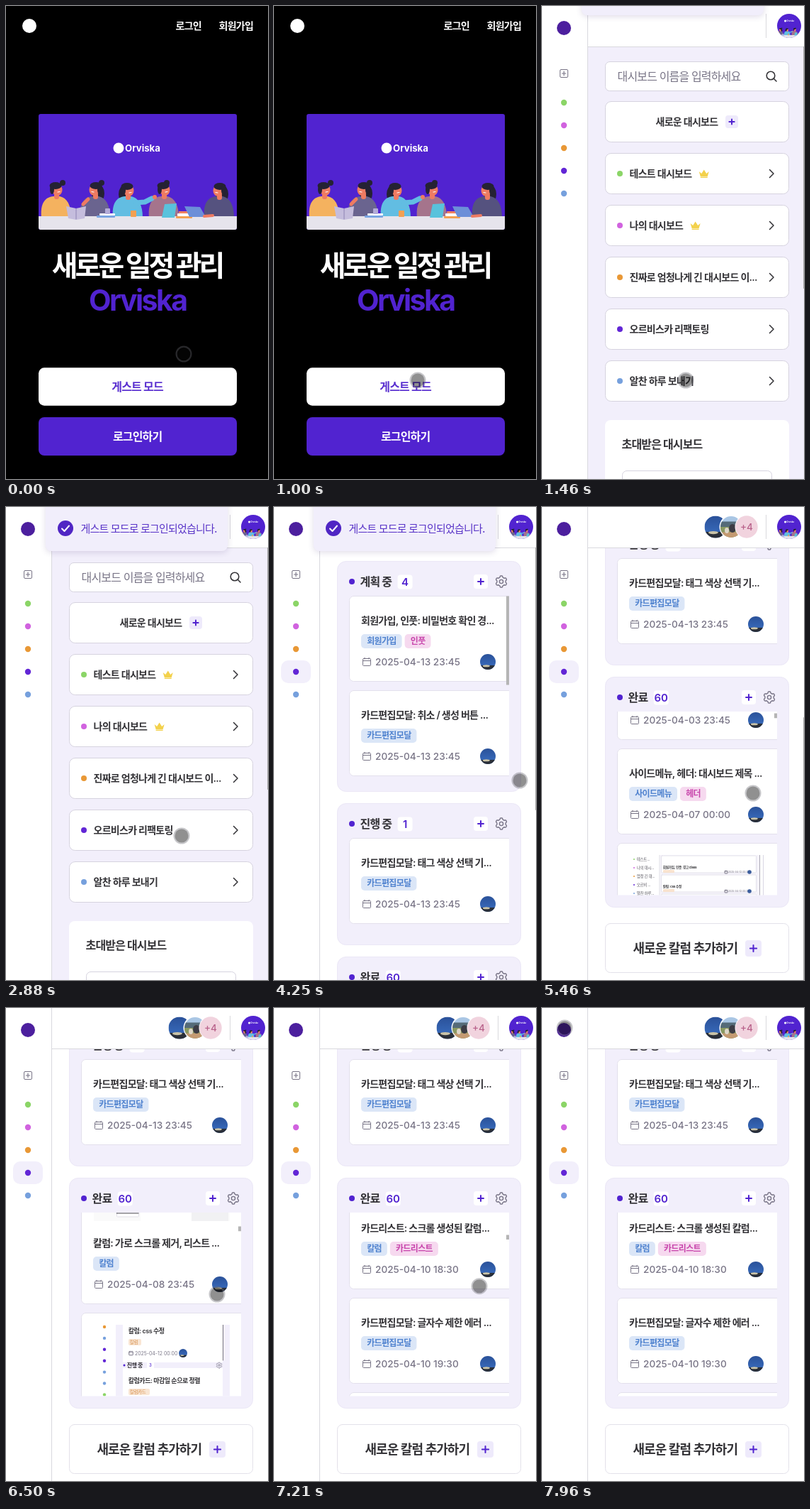
These frames come from a looping animation (370x666 px, 8000 ms). An HTML page with a canvas:

```html
<!DOCTYPE html>
<html lang="ko">
<head>
<meta charset="utf-8">
<title>Orviska</title>
<style>
html, body { margin: 0; width: 370px; height: 666px; overflow: hidden; background: #000; }
canvas { display: block; width: 370px; height: 666px; }
</style>
</head>
<body>
<canvas id="stage"></canvas>
<script>
const W = 370, H = 666, LOOP = 8000;
const canvas = document.getElementById('stage');
const ctx = canvas.getContext('2d');
const dpr = window.devicePixelRatio || 1;
canvas.width = W * dpr;
canvas.height = H * dpr;

const FONT = 'Inter, "Noto Sans CJK KR", "Noto Sans CJK JP", "Noto Sans CJK", sans-serif';
const PURPLE = '#5123d0', INK = '#333236', GRAY = '#787486', LILAC = '#f2effb', LINE = '#d9d9de';
const DOTS = ['#8bd567', '#d163df', '#e99836', '#6226d6', '#76a0dd'];
const TAGS = { b: ['#dbe6f7', '#4f82cf'], p: ['#f6d9ef', '#c846ac'] };

// drawing helpers
function box(x, y, w, h, r, fill, stroke) {
  ctx.beginPath();
  ctx.roundRect(x, y, w, h, r);
  if (fill) { ctx.fillStyle = fill; ctx.fill(); }
  if (stroke) { ctx.strokeStyle = stroke; ctx.lineWidth = 1; ctx.stroke(); }
}
function dot(x, y, r, fill) {
  ctx.beginPath();
  ctx.arc(x, y, r, 0, 7);
  ctx.fillStyle = fill;
  ctx.fill();
}
function oval(x, y, rx, ry, fill) {
  ctx.beginPath();
  ctx.ellipse(x, y, rx, ry, 0, 0, 7);
  ctx.fillStyle = fill;
  ctx.fill();
}
function path(points, color, width, fill) {
  ctx.beginPath();
  for (let i = 0; i < points.length; i += 2) ctx.lineTo(points[i], points[i + 1]);
  if (fill) { ctx.closePath(); ctx.fillStyle = color; ctx.fill(); return; }
  ctx.strokeStyle = color;
  ctx.lineWidth = width;
  ctx.lineCap = ctx.lineJoin = 'round';
  ctx.stroke();
}
// y is the optical middle of the line; returns the width
function text(s, x, y, size, weight, color, align = 'left', track) {
  const hangul = /[가-힣]/.test(s);
  const gap = track ?? (hangul ? -0.053 * size : 0);
  ctx.font = `${weight} ${size}px ${FONT}`;
  ctx.letterSpacing = gap + 'px';
  const w = ctx.measureText(s).width;
  if (align === 'center') x -= (w - gap) / 2;
  else if (hangul) x -= 0.03 * size;
  ctx.textAlign = 'left';
  ctx.fillStyle = color;
  ctx.fillText(s, x, y + 0.37 * size);
  return w;
}
function clipped(draw, ...area) {
  ctx.save();
  ctx.beginPath();
  if (area.length === 3) ctx.arc(...area, 0, 7); else ctx.rect(...area);
  ctx.clip();
  draw();
  ctx.restore();
}
function plus(x, y, r, color, width) {
  path([x - r, y, x + r, y], color, width);
  path([x, y - r, x, y + r], color, width);
}
function plusBox(x, y, size, bg) {
  box(x - size / 2, y - size / 2, size, size, 4, bg);
  plus(x, y, size * 0.2, PURPLE, 2);
}
function gear(x, y, k) {
  const pts = [];
  for (let i = 0; i <= 60; i++) {
    const a = i / 60 * Math.PI * 2;
    const r = k * (7.1 + Math.tanh(2.5 * Math.cos(a * 6)));
    pts.push(x + r * Math.sin(a), y + r * Math.cos(a));
  }
  path(pts, GRAY, 1.4 * k);
  ctx.beginPath();
  ctx.arc(x, y, 2.6 * k, 0, 7);
  ctx.stroke();
}
function calendar(x, y, k = 1) {
  box(x - 5.5 * k, y - 4.5 * k, 11 * k, 10 * k, k, null, GRAY);
  path([x - 5.5 * k, y - 1.5 * k, x + 5.5 * k, y - 1.5 * k], GRAY, k);
  for (const d of [-3, 3]) path([x + d * k, y - 6 * k, x + d * k, y - 4 * k], GRAY, k);
}
function photo(x, y, r) {
  clipped(() => {
    const g = ctx.createLinearGradient(0, y - r, 0, y + r);
    g.addColorStop(0, '#2a5199');
    g.addColorStop(0.65, '#3565b4');
    ctx.fillStyle = g;
    ctx.fillRect(x - r, y - r, 2 * r, 2 * r);
    ctx.fillStyle = '#2a2f38';
    ctx.fillRect(x - r, y + r * 0.45, 2 * r, r);
    oval(x - r * 0.2, y + r * 0.52, r * 0.45, r * 0.14, '#c9c3a8');
  }, x, y, r);
}
function fieldPhoto(x, y, r) {
  clipped(() => {
    ['#a9c6e4', '#556b78', '#8a9a62', '#c49a72'].forEach((c, i) => {
      ctx.fillStyle = c;
      ctx.fillRect(x - r, y - r + i * r / 2, 2 * r, r);
    });
    oval(x + 2, y + 2, 5, 6, '#3c3b44');
    oval(x - 6, y + 5, 3, 4, '#ded6c8');
  }, x, y, r);
}

// people around a table; local size 280 x 163
function person(x, y, shirt, dir, bun, long) {
  const hair = '#252233', skin = '#ee7b62';
  if (long) oval(x - dir * 4, y + 9, 9, 13, hair);
  if (bun) dot(x + bun, y - 6, 4, hair);
  ctx.beginPath();
  ctx.moveTo(x - 21, 146);
  ctx.bezierCurveTo(x - 23, 126, x - 16, 117, x - 4, 116);
  ctx.lineTo(x + 5, 116);
  ctx.bezierCurveTo(x + 15, 118, x + 21, 128, x + 21, 146);
  ctx.fillStyle = shirt;
  ctx.fill();
  box(x - 3, y + 8, 7, 9, 3, skin);
  oval(x + dir * 1.5, y + 4, 7, 8, skin);
  oval(x - dir, y - 2, 8.5, 5, hair);
  oval(x - dir * 6, y + 3, 3, 7, hair);
  path([x + dir * 2, y + 7, x + dir * 5, y + 6.5], '#fff', 1.2);
}
function picture(x, y, k) {
  ctx.save();
  ctx.translate(x, y);
  ctx.scale(k, k);
  box(0, 0, 280, 163, 3, PURPLE);
  dot(113, 48, 7.5, '#fff');
  text('Orviska', 122, 48, 13.2, 700, '#fff');
  person(25, 103, '#f4b25f', 1, 9, false);
  person(80, 103, '#6a648f', -1, 9, true);
  person(126, 104, '#62bde2', 1, 0, true);
  person(177, 103, '#a5748c', 1, 4, false);
  person(255, 104, '#55527f', -1, 0, true);
  path([137, 125, 150, 124, 160, 119], '#62bde2', 7);
  dot(164, 117, 3, '#ee7b62');
  path([63, 127, 70, 120], '#ee7b62', 5);
  path([10, 142, 24, 143, 40, 139], '#f4b25f', 7);
  box(0, 144, 280, 19, [0, 0, 3, 3], '#e6e4ec');
  path([39, 130, 53, 133, 67, 130, 65, 147, 53, 149, 42, 147], '#c5bddd', 0, true);
  path([53, 133, 53, 148], '#8e83b4', 1);
  box(82, 143, 26, 3, 1, '#7ba5e2');
  box(86, 140, 22, 3, 1, '#fff');
  box(94, 133, 7, 8, 1, '#b3abd8');
  box(130, 136, 8, 9, 1, '#f3a052');
  path([178, 127, 195, 126, 192, 146, 174, 146], '#59c2dc', 0, true);
  box(194, 144, 23, 3, 1, '#f3a052');
  box(196, 140, 20, 4, 1, '#fff');
  box(198, 137, 18, 3, 1, '#ef805f');
  path([206, 130, 228, 131, 236, 145, 213, 145], '#6c8fd8', 0, true);
  path([234, 144, 246, 143], '#ee7b62', 4);
  ctx.restore();
}

// screens
function landing() {
  ctx.fillStyle = '#000';
  ctx.fillRect(0, 0, W, H);
  dot(33, 28, 10, '#fff');
  text('로그인', 240, 28, 14, 600, '#fff');
  text('회원가입', 301, 28, 14, 600, '#fff');
  picture(46, 152, 1);
  text('새로운 일정 관리', 66, 365, 40, 700, '#fff', 'left', -4);
  text('Orviska', 117, 414, 41, 700, PURPLE, 'left', -2.5);
  box(46, 509.3, 280, 53.4, 8, '#fff');
  text('게스트 모드', 186, 535.7, 16, 600, '#5a30d0', 'center');
  box(46, 579, 280, 54, 8, PURPLE);
  text('로그인하기', 186, 605.7, 16, 600, '#fff', 'center');
}

function frameTop(board) {
  ctx.fillStyle = '#fff';
  ctx.fillRect(64, 0, W - 64, 57);
  ctx.fillRect(0, 0, 64, H);
  ctx.fillStyle = LINE;
  ctx.fillRect(64, 57, W - 64, 1);
  ctx.fillRect(64, 0, 1, H);
  ctx.fillRect(316, 11, 1, 34);
  dot(31, 31, 10, '#4c1f9e');
  box(25.5, 89.5, 11, 11, 1.5, null, GRAY);
  plus(31, 95, 2.8, GRAY, 1.2);
  if (board) {
    box(10, 216, 42, 32, 10, LILAC);
    photo(245, 28, 15.5);
    dot(267, 28, 16.5, '#fff');
    fieldPhoto(267, 28, 15);
    dot(289, 28, 16.5, '#fff');
    dot(289, 28, 15.7, '#f1d3de');
    text('+4', 289, 28, 13.5, 500, '#b8618a', 'center');
  }
  DOTS.forEach((c, i) => dot(31, 136 + 32 * i, 4.2, c));
  clipped(() => picture(349 - 29, 11, 34 / 163), 349, 28, 17);
}
function pageThumb(content, scroll) {
  const view = 609;
  ctx.fillStyle = '#acacac';
  ctx.fillRect(369, 57 + scroll * view / content, 1, view * view / content);
}
function search(x, y, w) {
  box(x, y, w, 41, 6, '#fff', '#d6d3df');
}
function crown(x, y) {
  path([x - 7, y - 3, x - 3.5, y, x, y - 5.5, x + 3.5, y, x + 7, y - 3, x + 5, y + 4, x - 5, y + 4], '#f3d14b', 0, true);
  box(x - 5, y + 4.6, 10, 1.4, 0, '#f3d14b');
}
function dashboards() {
  ctx.fillStyle = LILAC;
  ctx.fillRect(0, 0, W, H);
  search(89.5, 78.5, 259);
  text('대시보드 이름을 입력하세요', 107, 99, 16, 400, GRAY);
  ctx.beginPath();
  ctx.arc(323, 98, 5.8, 0, 7);
  ctx.strokeStyle = INK;
  ctx.lineWidth = 1.6;
  ctx.stroke();
  path([327.3, 102.3, 331, 106], INK, 1.6);
  const names = ['테스트 대시보드', '나의 대시보드', '진짜로 엄청나게 긴 대시보드 이...', '오르비스카 리팩토링', '알찬 하루 보내기'];
  for (let i = 0; i < 6; i++) box(89.5, 134.5 + 73 * i, 259, 57, 8, '#fff', '#d6d3df');
  text('새로운 대시보드', 161, 163, 14, 600, INK);
  plusBox(268, 163, 18, '#eeeafb');
  names.forEach((name, i) => {
    const y = 236 + 73 * i;
    dot(110, y, 4, DOTS[i]);
    const w = text(name, 124, y, 14, 600, INK);
    if (i < 2) crown(124 + w + 17, y);
    path([321.5, y - 5.5, 327, y, 321.5, y + 5.5], INK, 1.5);
  });
  box(89, 583, 260, 200, 8, '#fff');
  text('초대받은 대시보드', 113, 617, 16, 700, INK);
  search(113.5, 654.5, 211);
  frameTop(false);
  pageThumb(1088, 0);
}

// card pictures, drawn from the top of the image
function miniMenu(y) {
  ['테스트...', '나의 대시...', '엄청 긴 대...', '오르비 ...', '알찬 하루...'].forEach((s, i) => {
    dot(130, y + 6 + 12 * i, 1, DOTS[i]);
    text(s, 134, y + 6 + 12 * i, 5.5, 500, '#55535c');
  });
  path([166, y, 166, y + 160], '#dddbe4', 1);
  box(167, y, 140, 160, 0, '#f6f4fb');
  for (let i = 0; i < 5; i++) {
    const top = y + 10 + 27 * i;
    box(168.5, top - 9, 134, 24, 1, '#fff', '#e3e1ea');
    text(i % 2 ? '칼럼: css 수정' : '회원가입, 인풋: 경고 class', 171, top + 7, 4.6, 700, INK);
    box(171, top + 11, 16, 4, 1, '#f9e3cf');
    calendar(260, top + 14, 0.35);
    text('2025-04-12 00:00', 263, top + 14, 3.4, 400, GRAY);
    dot(293, top + 14, 2.8, '#3a5c9c');
  }
  path([307.5, y, 307.5, y + 160], '#aaa8b4', 1);
  path([312.5, y, 312.5, y + 160], '#d8d5e4', 1);
}
function miniBoard(y) {
  box(155, y, 10, 160, 0, LILAC);
  box(306, y, 10, 160, 0, LILAC);
  path([306.5, y, 306.5, y + 50], '#77747f', 1);
  [2, 4, 3, 3, 4, 4, 0, 1, 2, 3].forEach((c, i) => dot(139, y + 3 + 15.9 * i, 2.2, DOTS[c]));
  ['칼럼: css 수정', '칼럼카드: 마감일 순으로 정렬', '모달: 입력창 수정'].forEach((s, i) => {
    const top = y + 70 * i;
    text(s, 173, top + 9, 9, 600, INK);
    box(173, top + 20, i ? 30 : 18, 9, 2, '#f9e6d4');
    text(i ? '칼럼카드' : '칼럼', 175, top + 24.5, 6.5, 500, '#d58d49');
    calendar(176.5, top + 40, 0.5);
    text('2025-04-12 00:00', 182, top + 40, 6.9, 400, GRAY);
    photo(250, top + 40, 6);
    box(165, top + 53, 141, 8, 0, LILAC);
    dot(167, top + 57, 1.5, PURPLE);
    text('진행 중', 171, top + 57, 8, 700, INK);
    box(199, top + 53, 10, 8, 1, '#fff');
    text('3', 204, top + 57, 6, 500, PURPLE, 'center');
    gear(301, top + 57, 0.5);
  });
}
function miniColumns(y) {
  box(124, y, 192, 160, 0, '#fafafa');
  for (let i = 0; i < 6; i++) {
    const top = y + 27 * i - 3;
    box(156.5, top, 31, 22, 1, '#fff', '#e2e0e8');
    text('칼럼: 제목', 159, top + 5, 4.5, 600, INK);
    box(159, top + 9, 12, 3, 1, '#dbe6f7');
    dot(127, top + 12, 1, DOTS[i % 5]);
    text('대시보드', 131, top + 12, 4.5, 500, '#666');
    path([156, top + 17, 187, top + 17], '#4a4850', 1);
  }
  box(190, y, 72, 160, 0, '#fff');
  box(262, y, 52, 160, 0, '#f1f1f3');
  path([317, y + 70, 317, y + 160], '#777', 1);
}

const EDIT = [['카드편집모달', 'b']];
const todo = [
  { title: '회원가입, 인풋: 비밀번호 확인 경...', tags: [['회원가입', 'b'], ['인풋', 'p']], date: '04-13 23:45' },
  { title: '카드편집모달: 취소 / 생성 버튼 ...', tags: EDIT, date: '04-13 23:45' }
];
const doing = [{ title: '카드편집모달: 태그 색상 선택 기...', tags: EDIT, date: '04-13 23:45' }];
const done = [
  { title: '헤더: 프로필 메뉴 위치 수정', tags: [['헤더', 'p']], date: '04-03 23:45' },
  { title: '사이드메뉴, 헤더: 대시보드 제목 ...', tags: [['사이드메뉴', 'b'], ['헤더', 'p']], date: '04-07 00:00' },
  { title: '사이드메뉴: 목록 스크롤 영역 ...', tags: [['사이드메뉴', 'b']], date: '04-08 00:00', image: miniMenu },
  { title: '칼럼: 가로 스크롤 제거, 리스트 ...', tags: [['칼럼', 'b']], date: '04-08 23:45', image: miniColumns },
  { title: '칼럼: 마감일 순으로 카드 정렬 ...', tags: [['칼럼', 'b']], date: '04-09 23:45', image: miniBoard },
  { title: '카드리스트: 스크롤 생성된 칼럼...', tags: [['칼럼', 'b'], ['카드리스트', 'p']], date: '04-10 18:30' },
  { title: '카드편집모달: 글자수 제한 에러 ...', tags: EDIT, date: '04-10 19:30' },
  { title: '카드편집모달: 마감일 선택 ...', tags: EDIT, date: '04-10 20:00' }
];
const cardHeight = c => c.image ? 293 : 120;

function card(c, top) {
  const h = cardHeight(c);
  box(106.5, top, 240, h, 6, '#fff', '#e3e0ec');
  if (c.image) clipped(() => c.image(top + 16.5), 124, top + 16.5, 192, 160);
  const y = top + h - 120;
  text(c.title, 123.5, y + 34.5, 14, 600, INK);
  let x = 123;
  for (const [name, kind] of c.tags) {
    const [bg, fg] = TAGS[kind];
    ctx.font = `600 12px ${FONT}`;
    ctx.letterSpacing = '-0.636px';
    const w = ctx.measureText(name).width + 16;
    box(x, y + 53.5, w, 20, 5, bg);
    text(name, x + 8.5, y + 63.5, 12, 600, fg);
    x += w + 4;
  }
  calendar(131, y + 92.5);
  text('2025-' + c.date, 143, y + 92.5, 13.6, 500, GRAY);
  photo(302, y + 92.5, 11);
}
function column(top, h, name, count, cards, scroll, total, hover) {
  if (top > H || top + h < 57) return;
  box(89.5, top, 259, h, 12, LILAC, '#ebe7f6');
  dot(110, top + 28.5, 4, PURPLE);
  const x = 122 + text(name, 122, top + 28.5, 16, 700, INK) + 8;
  box(x, top + 19, 21, 20, 4, '#fff');
  text(count, x + 10.5, top + 28.5, 15, 600, PURPLE, 'center');
  plusBox(292, top + 28.5, 20, '#fff');
  gear(321, top + 28.5, 1);
  const list = top + 49, view = Math.min(259, h - 66);
  clipped(() => {
    let y = list - scroll;
    for (const c of cards) {
      if (y < list + view && y + cardHeight(c) > list) card(c, y);
      y += cardHeight(c) + 13;
    }
    if (total && hover) box(328, list + scroll * view / total, 4, view * view / total, 0, '#b5b5b5');
  }, 106, list - 0.5, 226, view + 0.5);
}
function board(scroll, inner, hover, bar) {
  ctx.fillStyle = '#fff';
  ctx.fillRect(0, 0, W, H);
  column(76.5 - scroll, 324, '계획 중', '4', todo, 0, 532, hover);
  column(417.5 - scroll, 199, '진행 중', '1', doing, 0, 0, hover);
  column(633.5 - scroll, 324, '완료', '60', done, inner, 10000, hover);
  const y = 980.5 - scroll;
  box(89.5, y, 259, 69, 7, '#fff', '#e3e1ea');
  text('새로운 칼럼 추가하기', 129, y + 34.5, 18, 600, INK);
  plusBox(298.5, y + 35, 23, '#eeeafb');
  frameTop(true);
  ctx.globalAlpha = bar;
  pageThumb(1003, scroll);
  ctx.globalAlpha = 1;
}

function toast(y) {
  ctx.save();
  ctx.shadowColor = 'rgba(60,40,110,.16)';
  ctx.shadowBlur = 8 * dpr;
  ctx.shadowOffsetY = 2 * dpr;
  box(56, y - 12, 257, 74, 8, '#f1eefb');
  ctx.restore();
  dot(84, y + 30, 11, '#5026c4');
  path([79, y + 30.5, 82.5, y + 34, 89, y + 26.5], '#fff', 2);
  text('게스트 모드로 로그인되었습니다.', 106, y + 30.5, 15, 500, '#5a35c8');
}
function pointer(x, y) {
  dot(x, y, 9.5, 'rgba(8,8,8,.45)');
  ctx.beginPath();
  ctx.arc(x, y, 10.4, 0, 7);
  ctx.strokeStyle = 'rgba(105,105,112,.38)';
  ctx.lineWidth = 2.2;
  ctx.stroke();
}

// motion: keys are [time, value], eased between neighbours
function track(t, keys) {
  let [t0, v0] = keys[0];
  for (const [t1, v1] of keys) {
    if (t < t1) {
      const p = Math.max(0, (t - t0) / (t1 - t0));
      return v0 + (v1 - v0) * (1 - Math.cos(Math.PI * p)) / 2;
    }
    [t0, v0] = [t1, v1];
  }
  return v0;
}
const moves = [
  [0, 251, 490], [780, 203, 527], [1720, 203, 527], [2460, 248, 463], [3480, 248, 463],
  [4020, 347, 385], [5060, 347, 385], [5270, 298, 403], [7130, 298, 403], [7860, 32, 28]
];
const moveX = moves.map(m => [m[0], m[1]]);
const moveY = moves.map(m => [m[0], m[2]]);
const pageKeys = [[4380, 0], [5080, 394]];
const innerKeys = [[5273, 0], [6080, 634], [6290, 634], [7040, 1197]];
const toastKeys = [[1350, -72], [1640, 0], [4450, 0], [4720, -72]];
const barKeys = [[5680, 1], [5880, 0]];

function draw(t) {
  ctx.setTransform(dpr, 0, 0, dpr, 0, 0);
  const x = track(t, moveX), y = track(t, moveY);
  if (t < 1300) landing();
  else if (t < 3420) dashboards();
  else board(Math.round(track(t, pageKeys)), Math.round(track(t, innerKeys)), x > 89 && x < 350, track(t, barKeys));
  const drop = track(t, toastKeys);
  if (drop > -72) toast(drop);
  pointer(x, y);
}

const start = performance.now();
function tick() {
  draw((performance.now() - start) % LOOP);
  requestAnimationFrame(tick);
}
tick();
</script>
</body>
</html>
```
